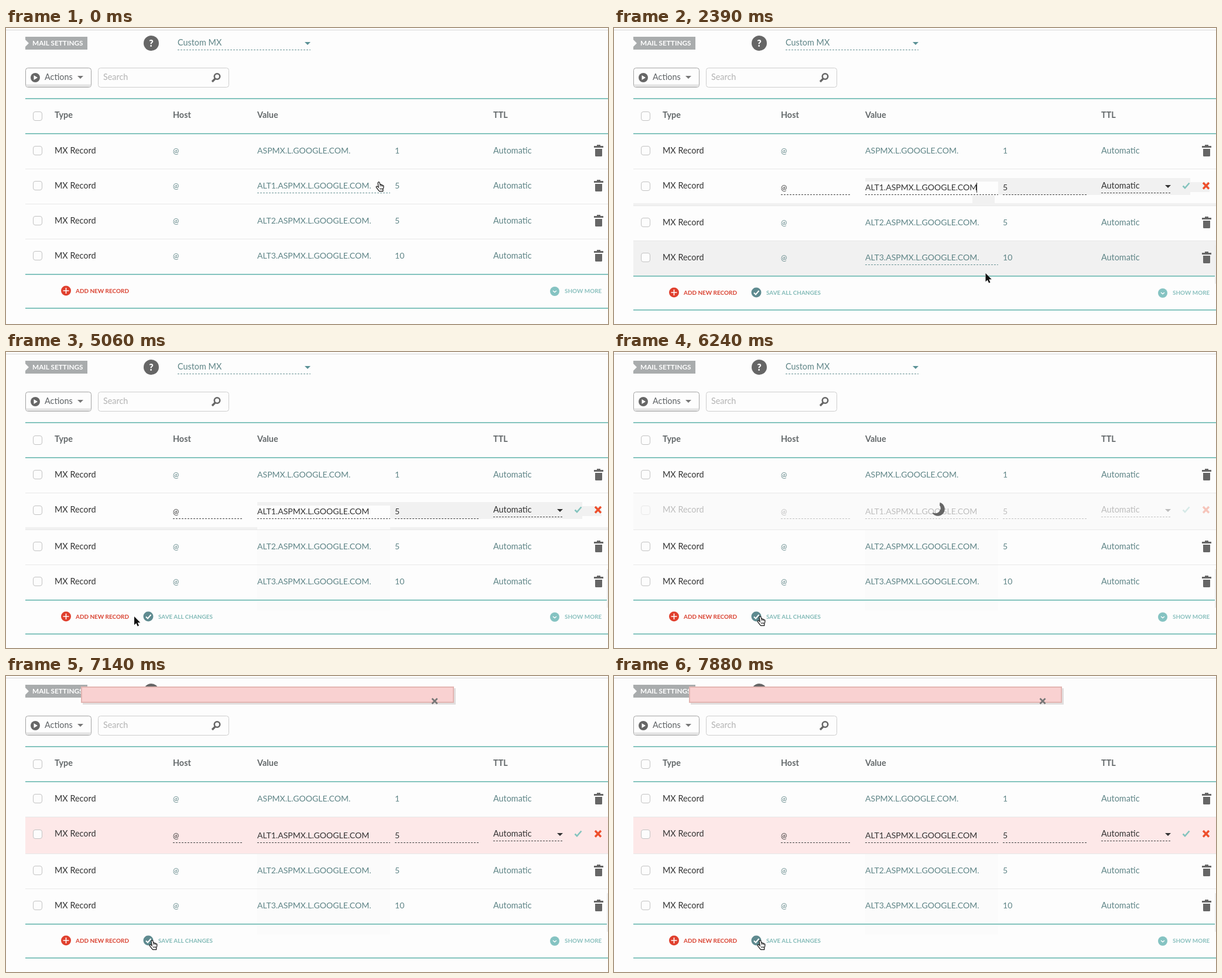
An HTML page for the animation above (8000 ms loop, 1028 by 507 pixels).

```html
<!DOCTYPE html>
<html lang="en">
<head>
<meta charset="utf-8">
<title>Mail settings</title>
<style>
html, body { margin: 0; width: 100%; height: 100%; overflow: hidden; background: #fdfdfd; }
svg { display: block; width: 1028px; height: 507px; }
text { font: 14.4px Lato, "Open Sans", sans-serif; white-space: pre; }
.head { font-weight: 700; fill: #63686a; }
.dark { fill: #333; }
.teal { fill: #5f8587; }
.value { font-size: 14.05px; }
.at { font-size: 12.4px; }
.small { font-size: 9.95px; font-weight: 700; }
.dash { fill: none; stroke-dasharray: 3 2; }
</style>
</head>
<body>
<svg id="stage" viewBox="0 0 1028 507"></svg>
<script>
const LOOP = 8000;
const TEAL = '#84c4be', GREY = '#666';

const text = (x, y, s, cls, extra = '') => `<text x="${x}" y="${y}" class="${cls}" ${extra}>${s}</text>`;
const rect = (x, y, w, h, fill, extra = '') =>
  `<rect x="${x}" y="${y}" width="${w}" height="${h}" fill="${fill}" ${extra}/>`;
const path = (d, fill, extra = '') => `<path d="${d}" fill="${fill}" ${extra}/>`;
const line = (d, color, width) => path(d, 'none', `stroke="${color}" stroke-width="${width}"`);
const disc = (x, y, r, fill) => `<circle cx="${x}" cy="${y}" r="${r}" fill="${fill}"/>`;
const dash = (x, y, w, color) => `<path class="dash" d="M${x} ${y}h${w}" stroke="${color}"/>`;
const group = (id, body) => `<g id="${id}">${body}</g>`;
const box = y => rect(46.5, y + .5, 15, 15, '#fdfdfd', 'rx="3.5" stroke="#c2c2c2"');
const down = (x, y, fill) => path(`M${x} ${y}h10l-5 5z`, fill);
const rule = y => rect(33, y, 995, 2, TEAL);
const border = y => rect(33, y, 995, 1, '#e8e8e8');

const trash = y =>
  path(`M1009 ${y}h6v2h5v3h-16v-3h5zM1006 ${y + 7}h12v11.5q0 1.5-1.5 1.5h-9q-1.5 0-1.5-1.5z`, GREY);

const row = (y, value, prio) =>
  box(y - 8) + text(83, y + 5, 'MX Record', 'dark') + text(285, y + 4.5, '@', 'teal at') +
  text(429, y + 5, value, 'teal value') + text(664, y + 5, prio, 'teal value') +
  text(832, y + 5, 'Automatic', 'teal') + trash(y - 10);

const toolbar =
  rect(0, 3, 1028, 1, '#d6d6d6') +
  path('M33 15h106v22H33v-5l6-6-6-6z', '#a9acad') +
  text(45, 30, 'MAIL SETTINGS', '', 'fill="#fff" style="font-size:11.8px;font-weight:700"') +
  disc(248, 26, 13, GREY) +
  text(248, 31.5, '?', '', 'fill="#fff" text-anchor="middle" style="font-size:16px;font-weight:900"') +
  text(293, 30, 'Custom MX', 'teal') + dash(293, 37.5, 227, '#6b9496') + down(510, 24, '#5b9296') +
  rect(33.5, 68.5, 112, 33, '#fdfdfd', 'rx="4" stroke="#a3a3a3"') +
  path('M34 96.500h111v1.500q0 3-3 3H37q-3 0-3-3z', '#e4e4e4') +
  disc(50, 85, 8, GREY) + path('M47.500 81l6.500 4-6.500 4z', '#fff') +
  text(66, 89, 'Actions', '', 'fill="#5f6366"') + down(122, 82, '#777') +
  rect(157.5, 68.5, 223, 33, '#fdfdfd', 'rx="4" stroke="#cdcdcd"') +
  text(166, 89, 'Search', '', 'fill="#b3b3b3"') +
  '<circle cx="360.500" cy="83" r="4.700" fill="none" stroke="#666" stroke-width="2.600"/>' +
  line('M357 87l-5 5', GREY, 3.4);

const header =
  rule(120) + box(143) + text(83, 154, 'Type', 'head') + text(285, 154, 'Host', 'head') +
  text(429, 154, 'Value', 'head') + text(832, 154, 'TTL', 'head') + rule(180);

const editRow =
  box(263) + text(83, 275, 'MX Record', 'dark') +
  text(285, 277.5, '@', 'dark at') + dash(285, 285.5, 120, '#444') +
  text(429, 278, 'ALT1.ASPMX.L.GOOGLE.COM<tspan id="dot">.</tspan>', 'dark value') + dash(429, 285.5, 227, '#444') +
  text(664, 278, '5', 'dark value') + dash(664, 285.5, 144, '#444') +
  text(832, 275, 'Automatic', 'dark') + dash(832, 282.5, 119, '#444') + down(941, 269, '#333') +
  line('M971.500 270.500l3.500 3.500 7.500-8.500', TEAL, 2.6) +
  line('M1006 265l10 10.500m0-10.500l-10 10.500', '#ee4f2c', 3.4);

const patches =
  rect(429, 257, 555, 29, '#f1f1f1') + rect(965, 264, 52, 17, '#f1f1f1') +
  rect(429, 263, 227, 23, '#fdfdfd');

const footer =
  rule(421) +
  disc(102.5, 450, 8.5, '#e0402e') + line('M102.500 445v10m-5-5h10', '#fff', 1.6) +
  text(119, 453.8, 'ADD NEW RECORD', 'small', 'fill="#d9402f"') +
  group('save', disc(243, 450, 8.5, '#5f8b90') + line('M239 450.500l3 3 5.500-6.500', '#fff', 2) +
    text(260, 453.8, 'SAVE ALL CHANGES', 'small', 'fill="#82bab7"')) +
  disc(937, 451, 8, '#85c3c2') + line('M934 450l3 2.500 3-2.500', '#fff', 1.4) +
  text(954, 453.8, 'SHOW MORE', 'small', 'fill="#8ac0be"') +
  rule(479);

const banner =
  rect(131, 21, 637, 28, '#e2dfdf') +
  rect(129, 19, 635, 26, '#f9d1d1', 'stroke="#e3b5b2" stroke-width="2"') +
  line('M727.500 38.500l9 9m0-9l-9 9', '#777', 2.8);

const pointers =
  group('arrow', path('M0 0V14.500L3.400 11.400 5.700 16.800 8 15.800 5.800 10.600H10.300Z', '#111',
    'stroke="#fff" stroke-width="1" paint-order="stroke"')) +
  group('hand', `<g transform="translate(-5.5 -1)">${
    path('M4 1.300Q5.300 0 6.300 1.600L7.300 5.200Q8.700 4.600 9.300 5.700Q10.800 5.200 11.300 6.500Q13.300 6.300 13.400 8.200' +
      'Q13.500 11 12.400 13L12.200 16.600H6Q3.500 13.500.8 9.800Q.2 8.400 1.700 8Q3 8 4.600 10L3.600 3Q3.300 2 4 1.300Z',
      '#fff', 'stroke="#111" stroke-width="1.200"')}${
    line('M7.300 5v3.500M9.400 5.800V8.500M11.400 6.600V9M7.300 11v3M9.200 11v3M11 11v3', '#111', .8)}</g>`) +
  group('beam', line('M-3-6.500q3 0 3 2v10q0 2-3 2M3-6.500q-3 0-3 2M3 7.500q-3 0-3-2M-1.500 3h3', '#111', 1.2));

document.getElementById('stage').innerHTML =
  toolbar + header + row(210, 'ASPMX.L.GOOGLE.COM.', '1') + border(241) +
  group('view', row(270, 'ALT1.ASPMX.L.GOOGLE.COM.', '5') + dash(429, 282.5, 227, '#6b9496')) +
  group('patches', patches) +
  group('strip', rect(33, 300, 995, 4, '#f1f1f1')) +
  group('trail', rect(612, 287, 38, 13, '#f1f1f1')) +
  group('ghost', rect(429, 300, 227, 143, '#fbfbfb')) +
  group('tint', rect(33, 242, 995, 62, '#fff', 'id="tintBox"')) +
  group('edit', editRow) +
  group('caret', rect(0, 265, 1, 17, '#222')) +
  group('lower',
    group('hover3', rect(33, 302, 995, 59, '#f1f1f1')) +
    group('hover4', rect(33, 362, 995, 59, '#f1f1f1')) +
    border(301) + row(330, 'ALT2.ASPMX.L.GOOGLE.COM.', '5') + border(361) +
    row(390, 'ALT3.ASPMX.L.GOOGLE.COM.', '10') +
    group('under3', dash(429, 342.5, 227, '#6b9496')) +
    group('under4', dash(429, 402.5, 227, '#6b9496')) + footer) +
  group('edge', rect(1026, 372, 2, 66, '#eee')) +
  group('spinner', path('M3.500-11.270A11.800 11.800 0 1 1-8 8.670Q-11 6-7 6.500A8.600 8.600 0 0 0 3-6.500Z', GREY)) +
  group('banner', banner) +
  group('pointer', pointers);

const el = {};
document.querySelectorAll('[id]').forEach(e => el[e.id] = e);
const show = (id, on) => el[id].setAttribute('visibility', on ? 'visible' : 'hidden');
const move = (id, x, y) => el[id].setAttribute('transform', `translate(${x} ${y})`);

const soft = p => p * p * (3 - 2 * p);
const speedUp = p => p * p;
const even = p => p;
const slowDown = p => 1 - (1 - p) * (1 - p);

// first step, last step, step count, end point, easing
const moves = [
  [140, 760, 5, 633, 268, even],
  [1810, 2390, 5, 634.5, 420, speedUp],
  [2540, 2840, 3, 626, 444, slowDown],
  [2980, 3880, 7, 255, 457, soft],
  [4030, 4470, 4, 210, 461, soft],
  [4620, 5060, 4, 219, 453, even],
  [5200, 5500, 3, 250, 453, slowDown]
];

function pointerAt(t) {
  let x = 637, y = 264;
  for (const [from, to, steps, ex, ey, ease] of moves) {
    if (t < from) break;
    const k = Math.min(steps, Math.floor((t - from) / (to - from) * (steps - 1) + 1.02));
    const p = ease(k / steps);
    x += (ex - x) * p;
    y += (ey - y) * p;
  }
  return [x, y];
}

function pointerKind(t, x, y) {
  if (t < 450) return 'hand';
  if (y < 286) return 'beam';
  if (y > 304 && y < 405) return 'hand';
  if (y > 443 && ((x > 234 && x < 355) || (x > 95 && x < 211))) return 'hand';
  return 'arrow';
}

function draw(t) {
  const [x, y] = pointerAt(t);
  const kind = pointerKind(t, x, y);
  const editing = t >= 290, saving = t >= 5790 && t < 6390, failed = t >= 6390;
  const hover3 = editing && y > 304 && y < 365, hover4 = y >= 365 && y < 426;

  move('pointer', x, y);
  ['arrow', 'hand', 'beam'].forEach(k => show(k, k === kind));

  show('view', !editing);
  show('edit', editing);
  show('save', editing);
  show('dot', editing && t < 1360);
  show('patches', editing && t < 5790);
  show('strip', t >= 1960 && t < 5790);
  show('trail', t >= 2100 && t < 2540);
  show('ghost', t >= 2690);
  show('edge', t >= 2250);
  move('lower', 0, editing ? 3 : 0);

  show('caret', t >= 1210 && t < 2690);
  move('caret', t < 1360 ? 622 : 619, 0);

  show('hover3', hover3);
  show('under3', hover3);
  show('hover4', hover4);
  show('under4', hover4);

  show('tintBox', saving || failed);
  el.tintBox.setAttribute('fill', failed ? '#fde8e8' : '#fafafa');
  el.edit.setAttribute('opacity', saving ? (t < 5940 ? .6 : .3) : 1);
  show('spinner', saving && t >= 5940);
  const turn = (Math.floor((t - 5790) / 150) - 3) * 90;
  el.spinner.setAttribute('transform', `translate(553 269) rotate(${turn})`);
  show('banner', failed);
}

const start = performance.now();
function tick() {
  draw((performance.now() - start) % LOOP);
  requestAnimationFrame(tick);
}
tick();
</script>
</body>
</html>
```
